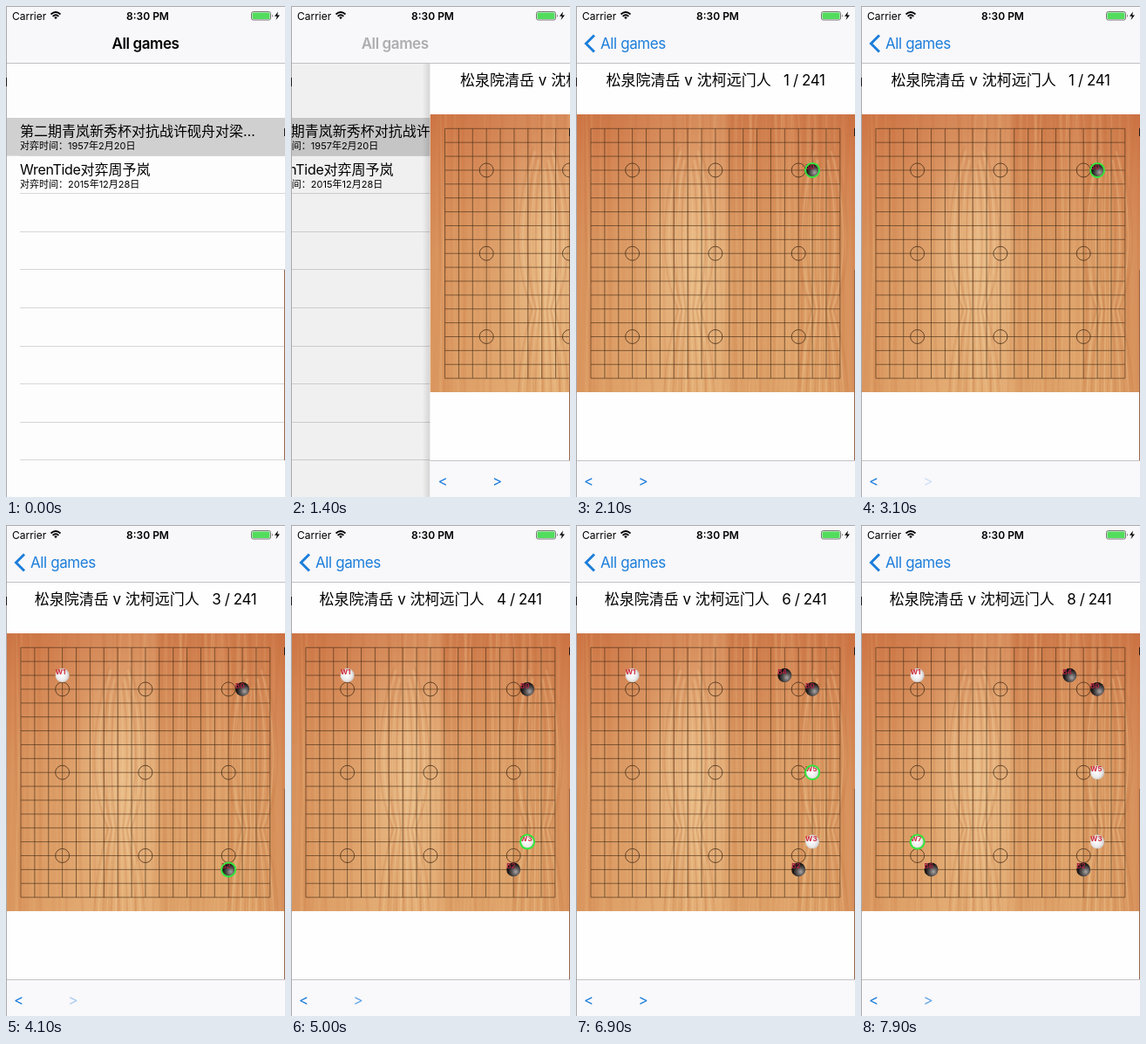
An HTML page that plays this animation: 320x562 px, repeating every 8000 ms.

```html
<!DOCTYPE html>
<html lang="zh-CN">
<head>
<meta charset="utf-8">
<title>Game record viewer</title>
<style>
  html, body { margin: 0; width: 100%; height: 100%; overflow: hidden; background: #fff; }
  svg { display: block; width: 320px; height: 562px; }
  text { font-family: Inter, "Noto Sans CJK SC", "Noto Sans CJK", sans-serif; white-space: pre; }
  .tight { letter-spacing: -.4px; }
  .row { font-size: 16px; }
  .row .tight { letter-spacing: -.3px; }
  .sub { font-size: 11px; }
  .title { font-size: 17px; }
  .blue { fill: #1c7edb; }
</style>
</head>
<body>
<svg viewBox="0 0 320 562">
  <defs>
    <linearGradient id="wood" x2="0" y2="1">
      <stop offset="0" stop-color="#cd7547"/>
      <stop offset=".2" stop-color="#d58957"/>
      <stop offset=".5" stop-color="#dc9d67"/>
      <stop offset="1" stop-color="#dfa46b"/>
    </linearGradient>
    <linearGradient id="bands">
      <stop offset="0" stop-color="#cb6f3c" stop-opacity=".3"/>
      <stop offset=".1" stop-color="#d4844c" stop-opacity=".15"/>
      <stop offset=".3" stop-color="#efc690" stop-opacity=".2"/>
      <stop offset=".53" stop-color="#efc690" stop-opacity=".3"/>
      <stop offset=".56" stop-color="#cf8850" stop-opacity=".2"/>
      <stop offset=".85" stop-color="#dca468" stop-opacity=".1"/>
      <stop offset="1" stop-color="#c8683a" stop-opacity=".3"/>
    </linearGradient>
    <radialGradient id="glow">
      <stop offset="0" stop-color="#f0cb98" stop-opacity=".6"/>
      <stop offset="1" stop-color="#f0cb98" stop-opacity="0"/>
    </radialGradient>
    <radialGradient id="black" cx=".66" cy=".66" r=".66">
      <stop offset="0" stop-color="#aaa5a5"/>
      <stop offset=".4" stop-color="#5c5858"/>
      <stop offset=".85" stop-color="#161313"/>
    </radialGradient>
    <radialGradient id="white" cx=".45" cy=".5" r=".6">
      <stop offset="0" stop-color="#fff"/>
      <stop offset=".6" stop-color="#ebe9e9"/>
      <stop offset="1" stop-color="#bdb9b9"/>
    </radialGradient>
    <linearGradient id="shade">
      <stop offset="0" stop-opacity="0"/>
      <stop offset="1" stop-opacity=".12"/>
    </linearGradient>
    <clipPath id="boardClip"><path d="M0 124H320V442H0Z"/></clipPath>
  </defs>

  <g id="list">
    <rect width="420" height="562" fill="#fefdfe"/>
    <rect y="128" width="420" height="43.6" fill="#d1d0d1"/>
    <g id="rules" stroke="#d6d5d8"></g>
    <text class="row" x="16" y="149">第二期青岚新秀杯对抗战许砚舟对梁…</text>
    <text class="sub" x="16" y="164">对弈时间：1957年2月20日</text>
    <text class="row" x="16" y="193"><tspan class="tight">WrenTide</tspan>对弈周予岚</text>
    <text class="sub" x="16" y="207.5">对弈时间：2015年12月28日</text>
  </g>
  <rect id="dim" width="320" height="562"/>

  <g id="detail">
    <rect x="-9" y="65" width="9" height="497" fill="url(#shade)"/>
    <rect width="320" height="562" fill="#fefefe"/>
    <text class="title" x="160" y="91" text-anchor="middle">松泉院清岳 v 沈柯远门人   <tspan class="tight" id="count"></tspan></text>
    <g clip-path="url(#boardClip)">
      <rect y="124" width="320" height="318" fill="url(#wood)"/>
      <rect y="124" width="320" height="318" fill="url(#bands)"/>
      <ellipse cx="132" cy="290" rx="55" ry="150" fill="url(#glow)"/>
      <g id="grain" fill="none"></g>
    </g>
    <g id="grid" fill="none" stroke="#452c16" stroke-opacity=".78"></g>
    <g id="stones"></g>
    <circle id="ring" r="8" fill="none" stroke="#35e53c" stroke-width="2"/>
    <rect y="520" width="320" height="42" fill="#f9f8fb"/>
    <path d="M0 520.5H320" stroke="#c4c3c7"/>
    <text class="title blue" x="9" y="550">&lt;</text>
    <text class="title blue" id="next" x="71.5" y="550">&gt;</text>
  </g>

  <rect width="320" height="65" fill="#f8f7f9"/>
  <path d="M0 65.5H320" stroke="#c1c0c3"/>
  <text class="title tight" id="heading" y="49" font-weight="600">All games</text>
  <g id="back" class="blue">
    <path d="M21 33.5L11.5 43L21 52.5" fill="none" stroke="#1c7edb" stroke-width="3"/>
    <text class="title tight" id="backText" y="49">All games</text>
  </g>

  <text x="7" y="15.5" font-size="12">Carrier</text>
  <g fill="none" stroke="#000" stroke-width="1.8">
    <path d="M51.5 9.5Q57 4.5 62.5 9.5M53.6 11.8Q57 8.8 60.4 11.8"/>
    <path d="M55.2 13L57 15.2L58.8 13Q57 11.6 55.2 13Z" fill="#000" stroke="none"/>
  </g>
  <text x="162.5" y="15.5" font-size="12" font-weight="600" text-anchor="middle">8:30 PM</text>
  <rect x="281.5" y="6.5" width="22" height="9.5" rx="2" fill="none" stroke="#777"/>
  <rect x="282.5" y="7.5" width="20" height="7.5" rx="1" fill="#52dc5c"/>
  <path d="M305 9.5q1.6 1.7 0 3.5Z" fill="#444"/>
  <path d="M312 6.5L308 11.8H310.8L309.6 16L314 10.4H311.2Z"/>

  <path d="M.5 0V562M0 .5H320" stroke="#aaa9ac" fill="none"/>
  <path d="M0 82h1v10h-1ZM319 140h1v9h-1Z" fill="#221a18"/>
  <path d="M319.5 302V520" stroke="#99674a"/>
</svg>
<script>
const $ = id => document.getElementById(id);
const clamp = v => Math.max(0, Math.min(1, v));
const LOOP = 8000, PUSH = 1291;
const gridX = c => 17 + c * 15.88, gridY = r => 140.3 + r * 15.88;

// column, row, time played
const moves = [
  [16, 3, 0], [3, 2, 3150], [15, 16, 4050], [16, 14, 4850],
  [14, 2, 5550], [16, 9, 6300], [4, 16, 7000], [3, 14, 7750]
];

function drawRules() {
  let d = '';
  for (let i = 1; i < 10; i++) d += `M16 ${Math.round(128 + i * 43.6) - .5}H420`;
  $('rules').innerHTML = `<path d="${d}"/>`;
}

// Fine vertical fibres, then two hourglass knots with a shared neck height.
function drawGrain() {
  let seed = 7, out = '';
  const rnd = () => (seed = seed * 16807 % 2147483647) / 2147483647;
  for (let i = 0; i < 80; i++) {
    const x = rnd() * 320, sway = () => (x + rnd() * 10 - 5).toFixed(1);
    const color = rnd() < .5 ? '#c06c3a' : '#f0c890';
    out += `<path d="M${sway()} 124C${sway()} 230 ${sway()} 330 ${sway()} 442" stroke="${color}"
      stroke-width="${(1 + rnd() * 3).toFixed(1)}" stroke-opacity="${(.05 + rnd() * .13).toFixed(2)}"/>`;
  }
  for (const cx of [130, 283]) {
    for (let i = 0; i < 6; i++) {
      const w = 4 + i * 5, color = i % 2 ? '#c47a45' : '#f4d3a0';
      for (const side of [-w, w]) {
        out += `<path d="M${cx + side} 442Q${cx + side * .9} 390 ${cx + side * .45} 348
          C${cx + side * 1.3} 290 ${cx + side} 215 ${cx + side * .4} ${190 - w}"
          stroke="${color}" stroke-opacity=".25" stroke-width="1.8"/>`;
      }
    }
  }
  $('grain').innerHTML = out;
}

function drawGrid() {
  let d = '', stars = '';
  for (let i = 0; i < 19; i++) {
    d += `M${gridX(i)} ${gridY(0)}V${gridY(18)}M${gridX(0)} ${gridY(i)}H${gridX(18)}`;
  }
  for (const c of [3, 9, 15]) for (const r of [3, 9, 15]) {
    stars += `<circle cx="${gridX(c)}" cy="${gridY(r)}" r="8"/>`;
  }
  $('grid').innerHTML = `<path d="${d}" stroke-width=".8"/>` + stars;
}

function drawStones() {
  $('stones').innerHTML = moves.map(([c, r], i) => {
    const x = gridX(c), y = gridY(r), white = i % 2;
    return `<g><circle cx="${x}" cy="${y}" r="8" fill="url(#${white ? 'white' : 'black'})"/>
      <text x="${x - 8}" y="${y - 1}" font-size="8" font-weight="700"
        fill="${white ? '#d02a3a' : '#a82440'}">${white ? 'W' : 'B'}${i}</text></g>`;
  }).join('');
}

function pushProgress(t) {
  const k = Math.max(0, t - PUSH) * .0153;
  return t >= 1900 ? 1 : 1 - Math.exp(-k) * (1 + k);
}

function render(t) {
  const p = pushProgress(t), slide = Math.pow(p, 1.2) * 93.5;
  $('list').setAttribute('transform', `translate(${-96 * p})`);
  $('dim').setAttribute('opacity', .1 * p);
  $('detail').setAttribute('transform', `translate(${320 * (1 - p)})`);
  $('detail').style.display = p > 0 ? '' : 'none';

  $('heading').setAttribute('x', 121.5 - slide);
  $('heading').setAttribute('opacity', 1 - clamp((t - 1250) / 215));
  $('backText').setAttribute('x', 121.5 - slide);
  $('back').setAttribute('opacity', clamp((t - 1500) / 300));

  const played = moves.filter(m => m[2] <= t).length;
  const [c, r, time] = moves[played - 1];
  [...$('stones').children].forEach((s, i) => s.style.display = i < played ? '' : 'none');
  $('ring').setAttribute('cx', gridX(c));
  $('ring').setAttribute('cy', gridY(r));
  $('count').textContent = `${played} / 241`;

  // the button dims while pressed, then recovers after the move
  const pressed = moves.some(m => m[2] > t && m[2] - t < 80);
  const recover = played > 1 ? clamp((t - time) / 250) : 1;
  $('next').setAttribute('opacity', pressed ? .2 : .2 + .8 * recover);
}

drawRules();
drawGrain();
drawGrid();
drawStones();
const start = performance.now();
(function frame() {
  render((performance.now() - start) % LOOP);
  requestAnimationFrame(frame);
})();
</script>
</body>
</html>
```
